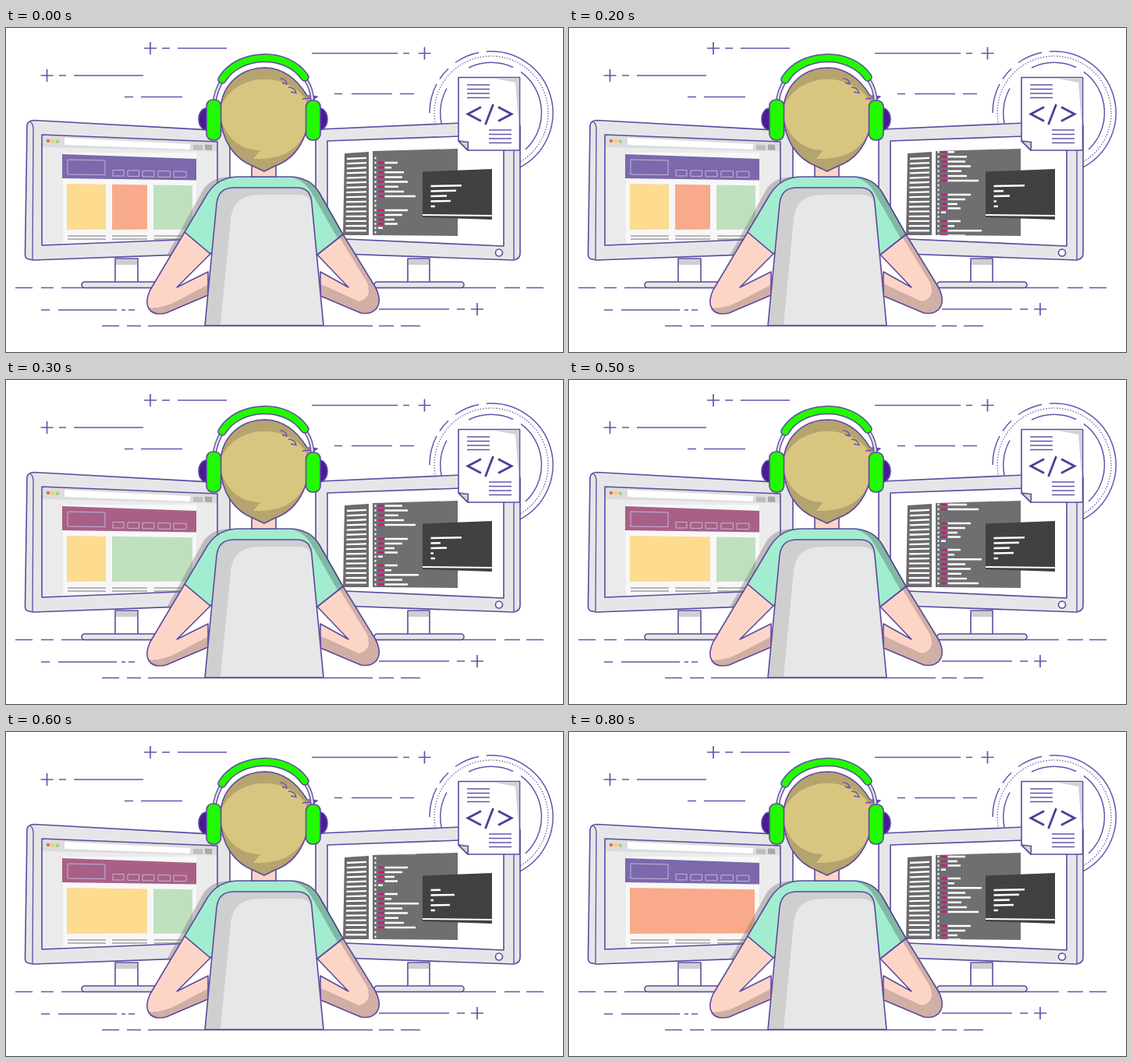
Write an HTML page that moves like this. It is 714 px wide and 416 px high and loops after 0.9 s.

```html
<!DOCTYPE html>
<html lang="en">
<head>
<meta charset="utf-8">
<title>Developer at work</title>
<style>
html, body { margin: 0; width: 100%; height: 100%; overflow: hidden; background: #fff; }
svg { display: block; width: 714px; height: 416px; }
.ink { fill: none; stroke: #6754ab; stroke-width: 1.7; }
.o { stroke: #5d4a9f; stroke-width: 1.6; stroke-linejoin: round; }
.grey { fill: #e6e6e9; }
.skin { fill: #fdd5c7; }
.shade { fill: #d0afa4; }
.green { fill: #22fa00; }
.glow { fill: #4b1a96; }
.thin { fill: none; stroke: #c3b5dc; stroke-width: 1; }
.white { stroke: #fff; fill: none; }
</style>
</head>
<body>
<svg viewBox="0 0 714 416">
  <defs>
    <clipPath id="editorClip"><path d="M470 158L579 155V267L470 266Z"/></clipPath>
    <clipPath id="pageClip"><path d="M46 137L271 146V270L46 279Z"/></clipPath>
    <clipPath id="rightArmClip"><path id="rightArm" d="M432 265L473 332C485 354 475 369 455 366L403 344V313L439 333L399 291Z"/></clipPath>
    <clipPath id="leftArmClip"><path id="leftArm" d="M229 262L185 336C176 355 182 371 205 366L259 343V313L219 333L262 290Z"/></clipPath>
    <path id="chair" d="M255 382L270 225C272 210 280 205 293 205H372C386 205 391 212 392 225L407 382Z"/>
    <path id="strap" d="M277 68C270 78 268 87 267 97M384 66C391 76 393 86 393 97"/>
    <path id="band" d="M277 66C298 31 360 29 383 63"/>
  </defs>

  <!-- background strokes -->
  <path id="dashes" class="ink"/>
  <g class="ink" style="stroke-width:1.5">
    <path d="M556 65.500A79 79 0 0 1 567 52.300M576 44.500A79 79 0 0 1 606 31.600M616 30.200A79 79 0 0 1 659 178.800M543 109A79 79 0 0 1 552 72"/>
    <circle cx="622" cy="109" r="73" style="stroke-width:1.2" stroke-dasharray="1.5 2"/>
    <path d="M565 77.500A65 65 0 0 0 563 137M593 51A65 65 0 0 1 650 50.500M660 56.300A65 65 0 0 1 666 156"/>
  </g>

  <!-- left monitor -->
  <path class="o" fill="#fff" d="M140 296H169V328H140Z"/><path fill="#cfcfd2" d="M141 297H168V304H141Z"/>
  <rect class="o grey" x="97" y="326" width="100" height="7.5" rx="3.7"/>
  <path class="o grey" d="M36 118.500L281 132Q287 133 287 139V284Q287 289 281 289L35 298L28 296.500Q24 295 24.5 290L27 125Q28 118.500 36 118.500Z"/>
  <path class="ink" style="stroke-width:1.4" d="M31 120Q35 123 35 130L34 298"/>
  <g clip-path="url(#pageClip)">
    <path fill="#ebebec" d="M46 136H272V280H46Z"/>
    <path fill="#f7f7f7" d="M73 160H244V280H73Z"/>
    <path fill="#dcdcde" d="M46 136L271 146V158L46 153Z"/>
    <path fill="#fff" d="M75 141L236 149V156L75 150Z"/>
    <path fill="#bdbdbd" d="M240 150L252 150.5V157L240 156.5Z"/>
    <path fill="#a8a8a8" d="M255 149.5L264 150V157L255 156.5Z"/>
    <circle cx="54" cy="145" r="2.3" fill="#ee675e"/><circle cx="60" cy="145.4" r="2.3" fill="#f4d34e"/><circle cx="66" cy="145.8" r="2.3" fill="#9bce83"/>
    <path id="banner" d="M72 162L244 168V195.500L72 193Z"/>
    <path class="thin" d="M79 169L127 170V188.500L79 188Z"/>
    <path id="tabs" class="thin"/>
    <g id="cards"></g>
    <path stroke="#a0a0a0" stroke-width="1.7" d="M79 267H128M79 271H128M136 267H181M136 271H181M190 267H239M190 271H239"/>
  </g>
  <path class="o" fill="none" d="M46 137L271 146V270L46 279Z"/>

  <!-- right monitor -->
  <path class="o" fill="#fff" d="M515 296H543V328H515Z"/><path fill="#cfcfd2" d="M516 297H542V304H516Z"/>
  <rect class="o grey" x="472" y="326" width="115" height="7.5" rx="3.7"/>
  <path class="o grey" d="M397 136Q397 131 403 130L651 119Q659 119 659 127V290Q659 296 651 298L403 289Q397 288 397 283Z"/>
  <path class="ink" style="stroke-width:1.4" d="M653 119Q651 122 651 130V298"/>
  <path class="o" fill="#fff" d="M412 145L638 137V280L412 270Z"/>
  <circle class="o" cx="632" cy="288.500" r="4.500" fill="#fff"/>
  <path fill="#6b6b6d" d="M434 161L465 159V266H432Z"/>
  <path id="sidebar" class="white" stroke-width="2.3"/>
  <path fill="#6e6f71" d="M470 158L579 155V267L470 266Z"/>
  <g clip-path="url(#editorClip)"><g id="code" stroke-width="2.5">
    <path id="codeKeys" stroke="#c9187e"/><path id="codeText" class="white"/>
  </g></g>
  <path fill="#414142" d="M534 184.500L623 181V246L534 243Z"/>
  <path class="white" stroke-width="2" d="M534 240L623 241"/>
  <g id="terminal"></g>

  <!-- document -->
  <path class="o" fill="#fff" d="M580 63.500H658.500V157H592L580 145Z"/>
  <path fill="#d3d3d7" d="M624 64.500H657.500V128L653 70Z"/>
  <path class="o" fill="#d3d3d7" d="M580 145L592.500 146.500L592 157Z"/>
  <path class="ink" d="M591 73H620M591 78.500H620M591 84H620M591 89.500H620M619 131H648M619 136.500H648M619 142H648M619 147.500H648"/>
  <path class="ink" style="stroke:#503c98;stroke-width:2.8" d="M609 101.500L592 110.500L609 119.500M624.500 98L614.500 124M631 101.500L648 110.500L631 119.500"/>

  <!-- person -->
  <path fill="#77777b" opacity=".4" d="M290 191C268 191 259 198 252 209L206 292L213 291L229 262L258 213Q267 197 290 191Z"/>
  <use href="#leftArm" class="skin"/>
  <path class="shade" clip-path="url(#leftArmClip)" d="M176 358Q196 363 220 350L262 328V346L205 372H176Z"/>
  <use href="#leftArm" class="o" fill="none"/>
  <use href="#rightArm" class="skin"/>
  <path class="shade" clip-path="url(#rightArmClip)" d="M434 262L427 268L463 327Q470 347 452 351L400 327V346L455 370H482V340Z"/>
  <use href="#rightArm" class="o" fill="none"/>
  <path class="o" fill="#a2edcf" d="M229 262L258 213C268 198 280 191 300 191H362C382 191 394 198 402 212L432 265L399 291L380 270H280L262 290Z"/>
  <path fill="#000" opacity=".22" d="M366 192C384 193 394 200 402 212L432 265L425 270L393 214C387 202 379 195 366 192Z"/>
  <path class="o skin" d="M315 170V191H346V170Z"/>
  <use href="#chair" fill="#cfcfcf"/>
  <path fill="#e6e7e9" d="M275 381L288 246C290 226 300 214 328 214H376Q390 215 391 226L406 381Z"/>
  <use href="#chair" class="o" fill="none"/>
  <g class="glow o"><ellipse cx="257" cy="117" rx="10" ry="14"/><ellipse cx="402" cy="117" rx="10" ry="14"/></g>
  <path class="o" fill="#b5a46e" d="M275 112C273 76 298 51 333 51C357 52 374 67 386 87L399 88L388 97C391 140 371 168 345 177L331 184L318 178C292 168 276 144 275 112Z"/>
  <path fill="#d8c680" d="M276 100C287 74 318 60 349 68C368 73 381 84 388 99C391 146 365 170 317 168L326 157C300 157 282 140 276 118Z"/>
  <path class="ink" style="stroke-width:1.4" d="M351 65Q358 64 360 72L354 70.500M362 76Q370 76 372 83.500L365 82M380 91L398 89"/>
  <g fill="none" stroke-linecap="round">
    <use href="#strap" stroke="#5d4a9f" stroke-width="5.2"/>
    <use href="#strap" stroke="#dedee4" stroke-width="2.5"/>
    <use href="#band" stroke="#5d4a9f" stroke-width="11.500"/>
    <use href="#band" stroke="#22fa00" stroke-width="8.500"/>
  </g>
  <g class="green o"><rect x="257" y="92" width="18.500" height="52" rx="8"/><rect x="384.500" y="93" width="18.500" height="51" rx="8"/></g>
</svg>
<script>
const LOOP = 900, STEPS = 9;
const $ = id => document.getElementById(id);
const setPath = (id, d) => $(id).setAttribute('d', d);
const line = (x1, x2, y, rise = 0) => `M${x1} ${y}L${x2} ${y - rise}`;
const plus = (x, y) => line(x - 8, x + 8, y) + `M${x} ${y - 8}V${y + 8}`;

function add(parent, d, attrs = {}) {
  const path = document.createElementNS('http://www.w3.org/2000/svg', 'path');
  for (const [key, value] of Object.entries({ d, ...attrs })) path.setAttribute(key, value);
  return $(parent).appendChild(path);
}

// One value per step, each held until the next.
function hold(el, prop, values) {
  const frames = values.map((value, i) => ({ [prop]: value, offset: i / STEPS, easing: 'steps(1, end)' }));
  frames.push({ [prop]: values[STEPS - 1], offset: 1 });
  el.animate(frames, { duration: LOOP, iterations: Infinity });
}
const showOn = (el, order, key) => hold(el, 'opacity', [...order].map(k => k === key ? 1 : 0));

const dashRows = [
  [26, 200, 210, 220, 283], [61, 68, 77, 87, 176], [88.5, 152, 163, 173, 226],
  [32.5, 392, 502, 509, 517], [84.5, 421, 431, 443, 495, 505, 523],
  [333.5, 12, 34, 45, 61, 71, 628, 639, 659, 667, 689],
  [362, 45, 56, 67, 142, 148, 153, 157, 165], [361, 478, 568, 578, 588],
  [382.5, 123, 145, 155, 173, 182, 470, 478, 497, 506, 531]
];
let dashes = plus(185, 26) + plus(52.5, 61) + plus(536.5, 32.5) + plus(604, 361);
for (const [y, ...xs] of dashRows)
  for (let i = 0; i < xs.length; i += 2) dashes += line(xs[i], xs[i + 1], y);
setPath('dashes', dashes);

setPath('tabs', [137, 156, 175, 195, 215].map((x, i) =>
  `M${x} ${182.5 + i * .4}h${14 + i * .5}v7.500h${-14 - i * .5}z`).join(''));
setPath('sidebar', Array.from({ length: 16 }, (_, i) =>
  line(437 - i * .1, 462, 168 + i * 6.15, 1.2 - i * .08)).join(''));

// Web page
const YELLOW = '#fddb8f', ORANGE = '#f8aa8a', GREEN = '#bfe0bf';
const layouts = {
  a: [[78, 128, YELLOW], [136, 181, ORANGE], [189, 239, GREEN]],
  b: [[78, 128, YELLOW], [136, 239, GREEN]],
  c: [[78, 181, YELLOW], [189, 239, GREEN]],
  d: [[78, 238, ORANGE]]
};
for (const [key, cards] of Object.entries(layouts))
  for (const [x1, x2, fill] of cards) {
    const top = x => 200 + (x - 78) / 70;
    showOn(add('cards', `M${x1} ${top(x1)}L${x2} ${top(x2)}V258.500L${x1} 259Z`, { fill }), 'aaabbccdd', key);
  }
hold($('banner'), 'fill', [...'pppmmmmpp'].map(k => k === 'p' ? '#7c69ac' : '#a96087'));

// Scrolling code: right end of each row, 0 for a blank row
const rowEnds = [502, 494, 529, 508, 515, 503, 510, 525, 0, 0, 515, 508, 498, 502, 483, 0];
const rowY = i => i < 8 ? i * 6.15 : i < 13 ? 43 + (i - 7) * 6 : 73 + (i - 12) * 5.4;
let keys = '', text = line(472.5, 474.5, 167);
for (let block = 0; block < 2; block++)
  rowEnds.forEach((end, i) => {
    const y = 173 + block * 95 + rowY(i);
    const right = block === 0 && i === 2 ? 510 : end;
    text += line(472.5, 474.5, y);
    if (i === 14) text += line(477, right, y);
    else if (right) {
      keys += line(477, 484.5, y);
      text += line(485.5, right, y);
    }
  });
setPath('codeKeys', keys);
setPath('codeText', text);
$('code').animate({ transform: ['translateY(0)', 'translateY(-90px)'] },
  { duration: LOOP, iterations: Infinity, easing: `steps(${STEPS}, end)` });

// Terminal output
const outputs = {
  a: [584, 577, 565, 570, 550],
  b: [584, 557, 565, 548, 550],
  c: [557, 575, 548, 569, 550]
};
for (const [key, ends] of Object.entries(outputs)) {
  const d = ends.map((x, i) => line(544.5, x, 203 + i * 6.5, (x - 544.5) * .02)).join('');
  showOn(add('terminal', d, { class: 'white', 'stroke-width': 2.5 }), 'aabbaacca', key);
}
</script>
</body>
</html>
```
